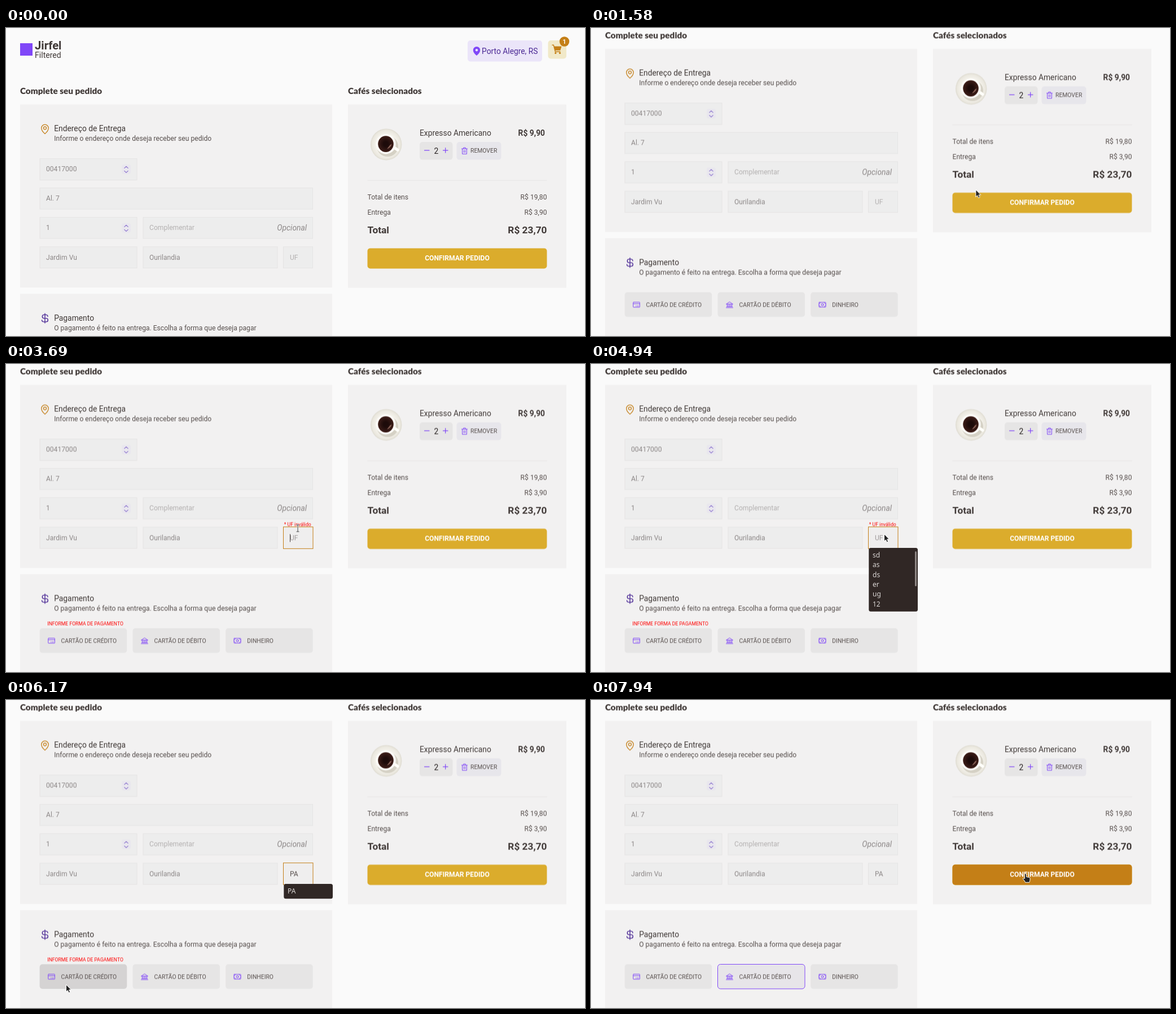
An HTML page that plays this animation: 1026x546 px, repeating every 8000 ms.

```html
<!DOCTYPE html>
<html lang="pt-BR">
<head>
<meta charset="utf-8">
<title>Checkout</title>
<style>
html, body { margin: 0; height: 100%; overflow: hidden; background: #fafafa; }
svg { display: block; width: 100vw; height: 100vh; }
text { font: 12.11px Roboto, sans-serif; fill: #574f4d; white-space: pre; }
.h { font: 900 15.3px Lato, sans-serif; fill: #403937; }
.m { font-size: 13.84px; fill: #403937; }
.s { font-size: 10.38px; }
.xs { font-size: 8.65px; fill: #f00; }
.b { font-weight: 700; }
.end { text-anchor: end; }
.mid { text-anchor: middle; }
.val { fill: #8d8888; }
.hint { fill: #b4b1b1; }
.list text { font: 12px "Noto Sans", sans-serif; fill: #dcd8d6; }
.card { fill: #f2f1f1; }
.input { fill: #ededed; stroke: #e5e4e4; }
.btn { fill: #e6e5e5; }
.over { fill: #d5d3d3; }
.line { fill: none; stroke: #8047f8; stroke-linecap: round; stroke-linejoin: round; }
.ptr { fill: #222; stroke: #fff; stroke-linejoin: round; }

/* on/off states share one 8 s clock */
[class^="t-"] { animation: 8s step-end infinite; }
.t-scroll { animation-name: scroll; }
.t-arrow { animation-name: arrow; }
.t-beam { animation-name: beam; }
.t-hand { animation-name: hand; }
.t-active { animation-name: active; }
.t-idle { animation-name: idle; }
.t-caret { animation-name: caret; }
.t-empty { animation-name: empty; }
.t-one { animation-name: one; }
.t-two { animation-name: two; }
.t-match { animation-name: match; }
.t-done { animation-name: done; }
.t-credit { animation-name: credit; }
.t-debit { animation-name: debit; }
.t-list { animation: list 8s linear infinite; }
.t-move { animation: move 8s linear infinite; }

@keyframes scroll {
  0% { transform: translateY(98.6px); }
  9% { transform: translateY(66px); }
  9.8% { transform: translateY(20px); }
  10.62% { transform: none; }
}
@keyframes arrow {
  0%, 20.5%, 41%, 97.4% { opacity: 0; }
  18.1%, 38.87%, 48.5% { opacity: 1; }
}
@keyframes beam {
  0%, 18.1%, 48.5% { opacity: 0; }
  15.12%, 41% { opacity: 1; }
}
@keyframes hand {
  0%, 38.87% { opacity: 0; }
  20.5%, 97.4% { opacity: 1; }
}
@keyframes active { 0%, 90.37% { opacity: 0; } 33% { opacity: 1; } }
@keyframes idle { 0% { opacity: 1; } 33% { opacity: 0; } }
@keyframes caret { 0%, 61.75% { opacity: 0; } 33% { opacity: 1; } }
@keyframes empty { 0%, 63.37% { opacity: 0; } 33% { opacity: 1; } }
@keyframes one { 0%, 66% { opacity: 0; } 63.37% { opacity: 1; } }
@keyframes two { 0%, 90.37% { opacity: 0; } 66% { opacity: 1; } }
@keyframes match { 0%, 90.37% { opacity: 0; } 63.37% { opacity: 1; } }
@keyframes done { 0% { opacity: 0; } 90.37% { opacity: 1; } }
@keyframes credit { 0%, 79.4% { opacity: 0; } 76.5% { opacity: 1; } }
@keyframes debit { 0%, 91.8% { opacity: 0; } 80.8% { opacity: 1; } }
@keyframes list {
  0%, 48.4% { opacity: 0; }
  50.62%, 63.36% { opacity: 1; }
  63.37%, 100% { opacity: 0; }
}
@keyframes move {
  0%, 15.12% { transform: translate(90px, 248px); }
  16.25% { transform: translate(200px, 251px); }
  18.12% { transform: translate(480px, 268px); }
  19.75% { transform: translate(681px, 286px); }
  21.25% { transform: translate(718px, 300px); }
  24.25%, 38.25% { transform: translate(731px, 306px); }
  38.87% { transform: translate(690px, 290px); }
  40.62% { transform: translate(510px, 232px); }
  42.25% { transform: translate(388px, 217px); }
  44.25% { transform: translate(455px, 250px); }
  46.12% { transform: translate(517px, 291px); }
  47.37%, 74.37% { transform: translate(519px, 301px); }
  75.75% { transform: translate(330px, 390px); }
  77.12%, 77.7% { transform: translate(106px, 504px); }
  80.25% { transform: translate(200px, 497px); }
  83.87%, 90.75% { transform: translate(300px, 490px); }
  93.12% { transform: translate(420px, 420px); }
  95.25% { transform: translate(610px, 300px); }
  96.5% { transform: translate(690px, 284px); }
  97.5% { transform: translate(740px, 294px); }
  99.25%, 100% { transform: translate(770px, 308px); }
}
</style>
</head>
<body>
<svg viewBox="0 0 1026 546">
<defs>
  <radialGradient id="plate"><stop offset=".6" stop-color="#f6f4ee"/><stop offset=".9" stop-color="#ebe8df"/><stop offset="1" stop-color="#dedbd1"/></radialGradient>
  <radialGradient id="brew"><stop offset=".3" stop-color="#1d0b0a"/><stop offset="1" stop-color="#3d1d18"/></radialGradient>
  <g id="spin">
    <rect x="-8" y="-8.5" width="16" height="17" rx="4" fill="#e9e7ee"/>
    <path class="line" d="M-3.2 -2.2L0 -5.2L3.2 -2.2M-3.2 2.8L0 5.8L3.2 2.8" style="stroke:#9079d0;stroke-width:1.3"/>
  </g>
  <rect id="pay" y="468.5" width="154.5" height="43.5" rx="5"/>
</defs>

<g class="t-scroll">
  <!-- header -->
  <g transform="translate(0 -98.6)">
    <rect x="25" y="27" width="22" height="22" fill="#8047f8"/>
    <text class="b" x="51" y="38" style="font-size:20.2px;fill:#403937">Jirfel</text>
    <text x="51" y="53" style="font-size:14.1px;fill:#403937">Filtered</text>
    <rect x="818" y="22" width="132" height="37.5" rx="5" fill="#ebe5f9"/>
    <path d="M834 33a6.2 6.2 0 0 1 6.2 6.3c0 4.200-3.500 7.400-6.200 9.700c-2.700-2.300-6.200-5.500-6.200-9.700A6.200 6.300 0 0 1 834 33zm0 3.900a2.300 2.300 0 1 0 .01 0z" fill="#8047f8"/>
    <text class="m" x="843" y="46" style="fill:#4b2995">Porto Alegre, RS</text>
    <rect x="960.5" y="22" width="32.500" height="32.500" rx="5" fill="#f1e9c9"/>
    <g fill="#c47f17">
      <path d="M970.700 32.500H984.500L982.300 39.700H972.500z"/>
      <path d="M968 30.300H970.300L973.300 42H982" fill="none" stroke="#c47f17" stroke-width="1.400" stroke-linecap="round"/>
      <circle cx="973.800" cy="44.500" r="1.600"/><circle cx="981.500" cy="44.500" r="1.600"/>
      <circle cx="989.500" cy="24" r="8.700"/>
    </g>
    <text class="s b mid" x="989.500" y="27.700" style="fill:#fff">1</text>
  </g>

  <text class="h" x="25" y="18">Complete seu pedido</text>
  <text class="h" x="606" y="18">Cafés selecionados</text>
  <rect class="card" x="25" y="37" width="553" height="324.500"/>
  <rect class="card" x="25" y="372.500" width="553" height="200"/>
  <rect class="card" x="606" y="37" width="387" height="325"/>

  <!-- address -->
  <g class="line" style="stroke:#c47f17;stroke-width:1.300">
    <path d="M69 89c-3-2.500-6.200-6-6.200-10.300a6.200 6.200 0 0 1 12.400 0C75.200 83 72 86.500 69 89z"/>
    <circle cx="69" cy="78.700" r="2.500"/>
  </g>
  <text class="m" x="85.200" y="84.700">Endereço de Entrega</text>
  <text x="85.200" y="101.500">Informe o endereço onde deseja receber seu pedido</text>
  <g class="input">
    <rect x="60" y="133" width="172" height="38"/>
    <rect x="60" y="185" width="483.500" height="37.500"/>
    <rect x="60" y="237" width="172" height="37.500"/>
    <rect x="243" y="237" width="300.500" height="37.500"/>
    <rect x="60" y="289.300" width="172" height="37.500"/>
    <rect x="243" y="289.300" width="238" height="37.500"/>
    <rect x="491.500" y="289.300" width="52" height="37.500"/>
  </g>
  <use href="#spin" x="213" y="152"/>
  <use href="#spin" x="213" y="256"/>
  <text class="val" x="71" y="155.800">00417000</text>
  <text class="val" x="71" y="207.800">Al. 7</text>
  <text class="val" x="71" y="259.800">1</text>
  <text class="hint" x="254" y="259.800">Complementar</text>
  <text class="m val end" x="533" y="260.500" style="font-style:italic">Opcional</text>
  <text class="val" x="71" y="312.300">Jardim Vu</text>
  <text class="val" x="254" y="312.300">Ourilandia</text>

  <!-- state field -->
  <g class="t-idle"><text class="hint" x="503" y="312.300">UF</text></g>
  <g class="t-active"><rect x="491.500" y="288.800" width="52.500" height="38.500" fill="#efeeee" stroke="#c47f17"/></g>
  <g class="t-empty">
    <text class="xs" x="492.700" y="287.300">* UF inválido</text>
    <text x="503" y="312.300" style="fill:#a09b9b">UF</text>
  </g>
  <g class="t-caret"><path d="M503.500 301.500V315.500" stroke="#403937"/></g>
  <g class="t-one"><text x="503" y="312.300">P</text></g>
  <g class="t-two"><text x="503" y="312.300">PA</text></g>
  <g class="t-done"><text class="val" x="503" y="312.300">PA</text></g>

  <!-- payment -->
  <g class="line" style="stroke:#4b2995;stroke-width:1.400">
    <path d="M69 407.500V424.500M74 412.800c0-2-1.500-3-3.400-3h-3.200a3.100 3.100 0 0 0 0 6.200h3.800a3.100 3.100 0 0 1 0 6.300h-4.200c-2 0-3.400-1.200-3.400-3.100"/>
  </g>
  <text class="m" x="85.200" y="420.500">Pagamento</text>
  <text x="85.200" y="437.300">O pagamento é feito na entrega. Escolha a forma que deseja pagar</text>
  <g class="t-active"><text class="xs" x="73.300" y="463">INFORME FORMA DE PAGAMENTO</text></g>
  <g class="btn"><use href="#pay" x="59.700"/><use href="#pay" x="224.500"/><use href="#pay" x="389.200"/></g>
  <g class="t-credit"><use class="over" href="#pay" x="59.700"/></g>
  <g class="t-debit"><use class="over" href="#pay" x="224.500"/></g>
  <g class="t-done"><use href="#pay" x="224.500" fill="#e7e5e9" stroke="#8047f8"/></g>
  <g class="line">
    <rect x="74.800" y="486" width="11.600" height="9" rx=".6"/>
    <path d="M75 488.700H86.300M82 492.800H84.300M79.500 492.800H80.200"/>
    <path d="M239.800 489.300L245.500 485.500L251.200 489.300zM241.500 489.500V493.500M244.200 489.500V493.500M246.800 489.500V493.500M249.500 489.500V493.500M240.500 493.800H250.500M239.500 495.700H251.500"/>
    <rect x="404" y="486.300" width="12" height="8.400" rx=".5"/>
    <circle cx="410" cy="490.500" r="2"/>
    <path d="M404 489.300L407 486.500M413 486.500L416 489.300M404 491.700L407 494.500M413 494.500L416 491.700"/>
  </g>
  <text class="s" x="97.500" y="494.300">CARTÃO DE CRÉDITO</text>
  <text class="s" x="262.500" y="494.300">CARTÃO DE DÉBITO</text>
  <text class="s" x="427.300" y="494.300">DINHEIRO</text>

  <!-- summary -->
  <ellipse cx="673.700" cy="107.800" rx="27.700" ry="28" fill="url(#plate)"/>
  <ellipse cx="676" cy="111" rx="19" ry="18.500" fill="#d5d1c5"/>
  <path d="M686 112L694 117.500" stroke="#fffefa" stroke-width="5" stroke-linecap="round"/>
  <circle cx="673" cy="107" r="17.800" fill="#fdfcf8"/>
  <ellipse cx="673" cy="107" rx="13.800" ry="14.300" fill="url(#brew)"/>
  <path d="M675 116q7-2 8.500-9l-3 2z" fill="#8a6258"/>
  <text class="m" x="733" y="92">Expresso Americano</text>
  <text class="m b end" x="955" y="92">R$ 9,90</text>
  <rect class="btn" x="733" y="103.500" width="58.500" height="31.500" rx="5"/>
  <rect x="798.500" y="103.500" width="79" height="31.500" rx="5" fill="#e7e6eb"/>
  <g class="line">
    <path d="M741.500 118.300H750M774.500 118.300H783M778.700 114V122.500" style="stroke-width:1.200"/>
    <path d="M807.500 115.500H817.500M810.700 115.300V113.500H814.300V115.300M808.600 115.700V124.700H816.400V115.700M811.300 118.200V122M813.700 118.200V122"/>
  </g>
  <text class="m mid" x="762.300" y="124" style="fill:#272221">2</text>
  <text class="s" x="823" y="122.700">REMOVER</text>
  <path d="M640.500 171.500H958.500" stroke="#e5e4e4"/>
  <text x="640.500" y="205">Total de itens</text>
  <text class="end" x="958.500" y="205">R$ 19,80</text>
  <text x="640.500" y="232.800">Entrega</text>
  <text class="end" x="958.500" y="232.800">R$ 3,90</text>
  <g style="--big:17.300px">
    <text class="b" x="640.500" y="265.700" style="font-size:var(--big);fill:#403937">Total</text>
    <text class="b end" x="958.500" y="265.700" style="font-size:var(--big);fill:#403937">R$ 23,70</text>
  </g>
  <rect x="640.500" y="291.800" width="318" height="36" rx="5" fill="#dbac2c"/>
  <g class="t-hand"><rect x="640.500" y="291.800" width="318" height="36" rx="5" fill="#c47f17"/></g>
  <text class="b mid" x="799.500" y="313.300" style="fill:#fff">CONFIRMAR PEDIDO</text>
</g>

<!-- suggestions -->
<g class="t-list">
  <g class="list">
    <rect x="492.300" y="326" width="86.700" height="112.700" rx="3.500" fill="#302725"/>
    <rect x="574" y="332" width="3" height="62" rx="1.500" fill="#8d8684"/>
    <text x="499" y="342.800">sd</text>
    <text x="499" y="360.200">as</text>
    <text x="499" y="377.500">ds</text>
    <text x="499" y="394.800">er</text>
    <text x="499" y="412.200">ug</text>
    <text x="499" y="429.500">12</text>
  </g>
</g>
<g class="t-match">
  <g class="list">
    <rect x="492.300" y="326" width="86.700" height="26.300" rx="3.500" fill="#302725"/>
    <text x="499" y="343">PA</text>
  </g>
</g>

<!-- pointer -->
<g class="t-move">
  <g class="t-arrow"><path class="ptr" d="M.5 .5V13.300L3.400 10.700L5.300 15L7.700 14L5.800 9.800H9.500z"/></g>
  <g class="t-beam">
    <path d="M-2.500 -6H2.500M0 -6V6M-2.500 6H2.500" stroke="#fff" stroke-width="2.500"/>
    <path d="M-2.500 -6H2.500M0 -6V6M-2.500 6H2.500" stroke="#333"/>
  </g>
  <g class="t-hand"><path class="ptr" d="M-1.600 1.200a1.600 1.600 0 0 1 3.200 0V5.500L6.300 6.500Q8.300 7 8.200 9L7.700 12.500L6.800 15.300H-.5L-1.500 13L-4.500 9.300Q-4.500 7.300-2.800 7.800L-1.600 9z"/></g>
</g>
</svg>
</body>
</html>
```
